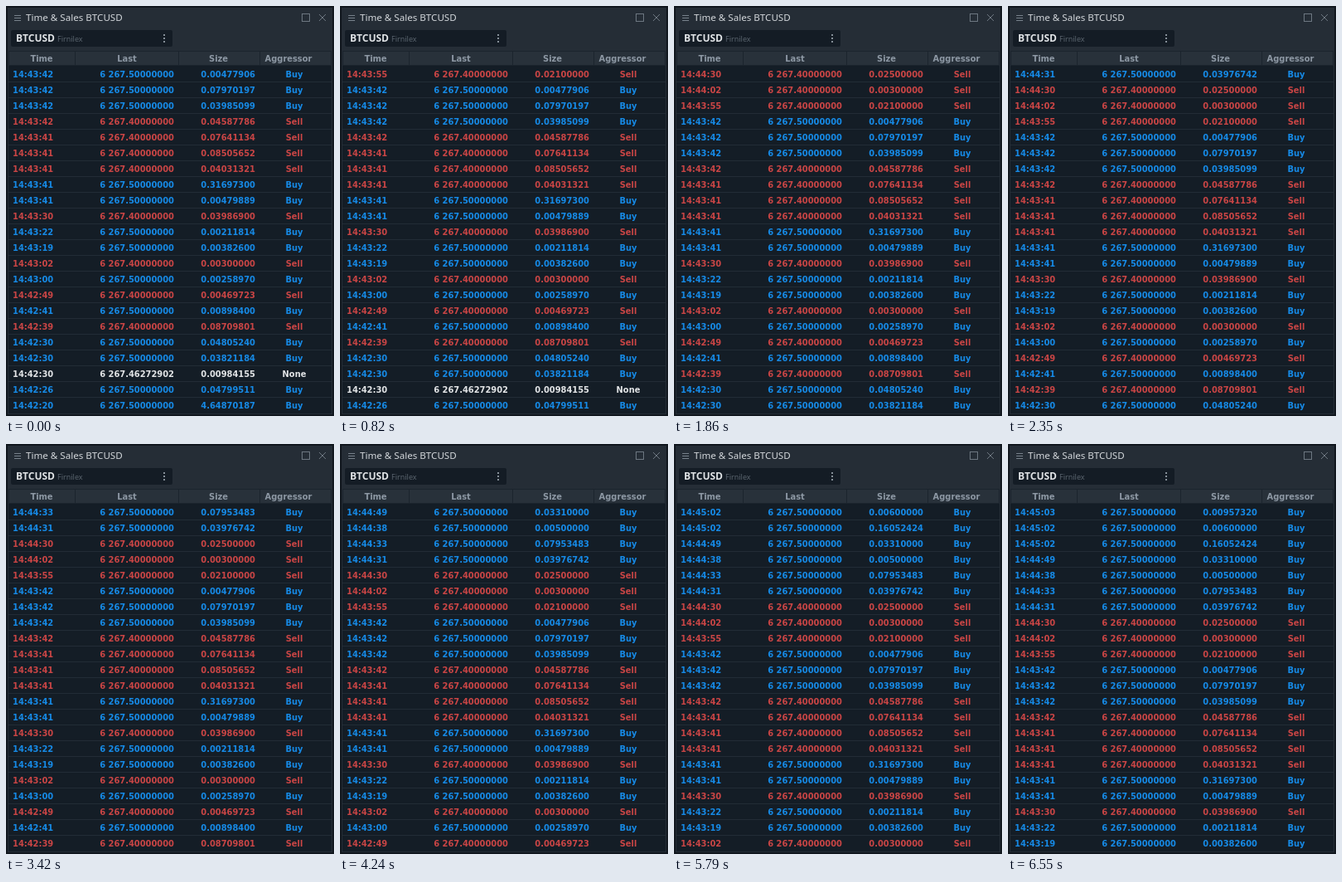
Animation of 396x494 px, one loop 6960 ms. Source, as an HTML page with a canvas:

```html
<!DOCTYPE html>
<html lang="en">
<head>
<meta charset="utf-8">
<title>Time &amp; Sales</title>
<style>
  html, body { margin: 0; width: 100%; height: 100%; overflow: hidden; background: #141d26; }
  canvas { display: block; width: 396px; height: 494px; }
</style>
</head>
<body>
<canvas id="stage" width="396" height="494"></canvas>
<script>
const ctx = document.getElementById('stage').getContext('2d');

const LOOP = 6960;
const ARRIVALS = [820, 1480, 1860, 2350, 3420, 3830, 4240, 5430, 5790, 6550];
const VISIBLE = 22;
const ROW_HEIGHT = 19;

// Newest trade first: time, size, side.
const TRADES = `
14:45:03 0.00957320 Buy
14:45:02 0.00600000 Buy
14:45:02 0.16052424 Buy
14:44:49 0.03310000 Buy
14:44:38 0.00500000 Buy
14:44:33 0.07953483 Buy
14:44:31 0.03976742 Buy
14:44:30 0.02500000 Sell
14:44:02 0.00300000 Sell
14:43:55 0.02100000 Sell
14:43:42 0.00477906 Buy
14:43:42 0.07970197 Buy
14:43:42 0.03985099 Buy
14:43:42 0.04587786 Sell
14:43:41 0.07641134 Sell
14:43:41 0.08505652 Sell
14:43:41 0.04031321 Sell
14:43:41 0.31697300 Buy
14:43:41 0.00479889 Buy
14:43:30 0.03986900 Sell
14:43:22 0.00211814 Buy
14:43:19 0.00382600 Buy
14:43:02 0.00300000 Sell
14:43:00 0.00258970 Buy
14:42:49 0.00469723 Sell
14:42:41 0.00898400 Buy
14:42:39 0.08709801 Sell
14:42:30 0.04805240 Buy
14:42:30 0.03821184 Buy
14:42:30 0.00984155 None
14:42:26 0.04799511 Buy
14:42:20 4.64870187 Buy`.trim().split('\n').map(line => line.split(' '));

const SIDES = {
  Buy: { color: '#168ae6', price: '6 267.50000000' },
  Sell: { color: '#c94545', price: '6 267.40000000' },
  None: { color: '#e2e4e6', price: '6 267.46272902' },
};

const HEADERS = [['Time', 3, 83, 43], ['Last', 83, 208, 146], ['Size', 208, 306, 256.5], ['Aggressor', 306, 392, 341]];

// Prefer the condensed cut; where it is missing, a smaller regular width fits the columns.
const condensed = 'bold 11px "DejaVu Sans Condensed", "Noto Sans", sans-serif';
const regular = 'bold 10px "DejaVu Sans", sans-serif';
ctx.font = condensed;
const BOLD = Math.abs(ctx.measureText('14:43:42').width - 50) < 1.5 ? condensed : regular;

function box(x, y, w, h, color) {
  ctx.fillStyle = color;
  ctx.fillRect(x, y, w, h);
}

function text(value, x, y, font, color, align = 'left') {
  ctx.font = font;
  ctx.fillStyle = color;
  ctx.textAlign = align;
  ctx.fillText(value, x, y);
}

function drawTitleBar() {
  for (let y = 11; y <= 17; y += 3) box(10, y, 8, 1, '#77818b');
  text('Time & Sales BTCUSD', 24, 18, '11.6px "Noto Sans", sans-serif', '#d3d7db');

  ctx.strokeStyle = '#6d7781';
  ctx.lineWidth = 1;
  ctx.strokeRect(357.5, 9.5, 9, 9);
  ctx.beginPath();
  ctx.moveTo(378, 10);
  ctx.lineTo(386, 18);
  ctx.moveTo(386, 10);
  ctx.lineTo(378, 18);
  ctx.stroke();
}

function drawSymbolField() {
  ctx.fillStyle = '#141c25';
  ctx.beginPath();
  ctx.roundRect(6, 29, 195, 20, 2);
  ctx.fill();
  text('BTCUSD', 12, 43, 'bold 12px "Noto Sans", sans-serif', '#dfe2e5');
  text('Firnilex', 62, 43, '9px "Noto Sans", sans-serif', '#59636d');
  for (let y = 34; y <= 42; y += 4) box(190, y, 2, 2, '#858e97');
}

function drawHeader() {
  box(3, 54, 390, 18, '#1b242d');
  for (const [label, left, right, center] of HEADERS) {
    box(left + 1, 55, right - left - 1, 16, '#28313a');
    text(label, center, 67, BOLD, '#8d98a4', 'center');
  }
}

function drawRow([time, size, side], index) {
  const { color, price } = SIDES[side];
  const y = 86 + index * ROW_HEIGHT;
  text(time, 8, y, BOLD, color);
  text(price, 203, y, BOLD, color, 'right');
  text(size, 301, y, BOLD, color, 'right');
  text(side, 348, y, BOLD, color, 'center');
  if (index < VISIBLE - 1) box(3, y + 5, 390, 1, '#222c36');
}

function draw(time) {
  box(0, 0, 396, 494, '#10161d');
  box(2, 2, 392, 490, '#252d36');
  box(3, 72, 390, 419, '#141d26');
  drawTitleBar();
  drawSymbolField();
  drawHeader();

  const arrived = ARRIVALS.filter(at => at <= time).length;
  const first = ARRIVALS.length - arrived;
  TRADES.slice(first, first + VISIBLE).forEach(drawRow);
}

const start = performance.now();
function tick() {
  draw((performance.now() - start) % LOOP);
  requestAnimationFrame(tick);
}
tick();
</script>
</body>
</html>
```
